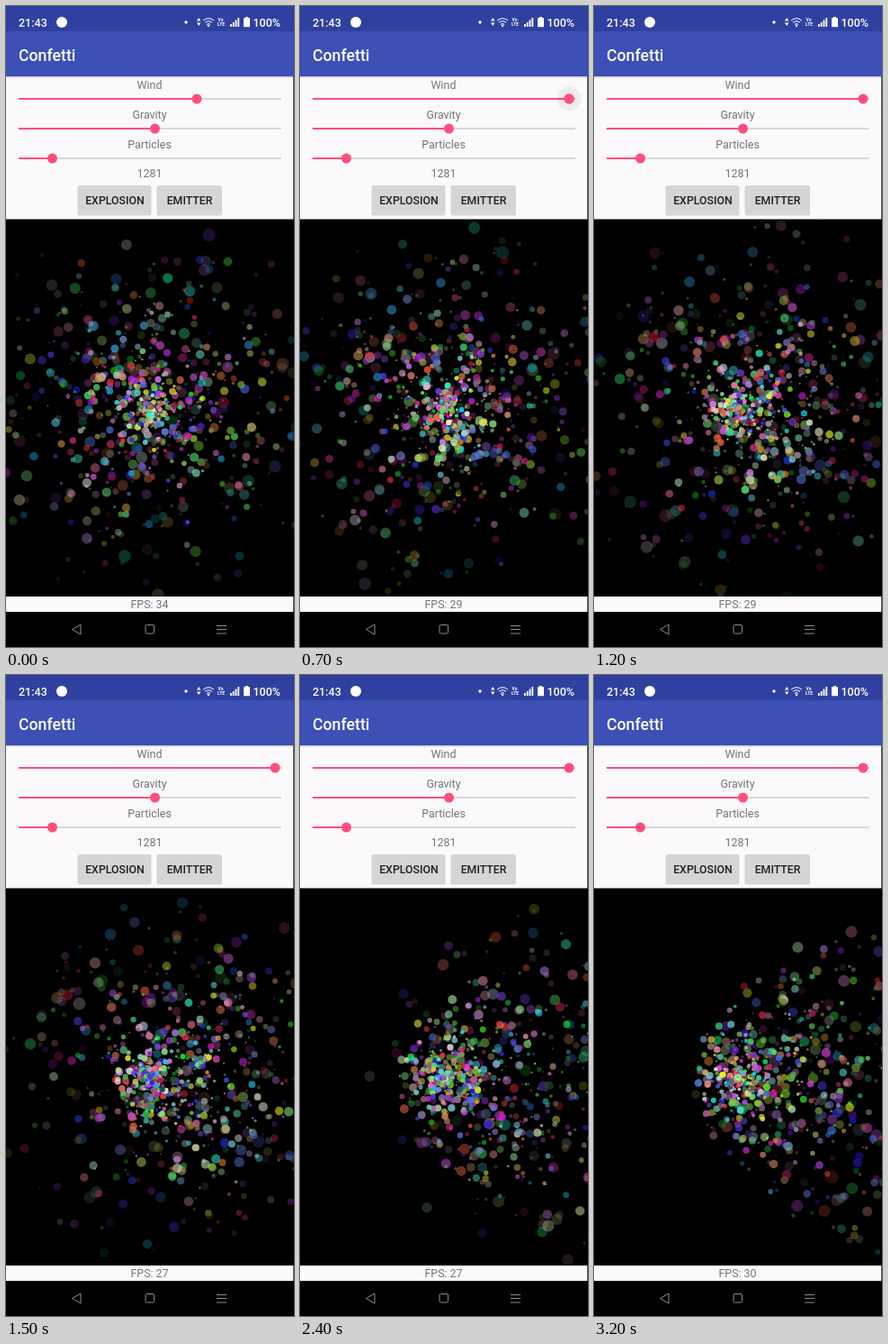
Animation of 320x711 px, one loop 3.3 s. Source, as an HTML page with a canvas:

```html
<!DOCTYPE html>
<html lang="en">
<head>
<meta charset="utf-8">
<title>Confetti</title>
<style>
  html, body { margin: 0; width: 100%; height: 100%; overflow: hidden; background: #000; }
  svg, canvas { position: absolute; left: 0; top: 0; display: block; }
  canvas { top: 236.5px; }
  text { font: 12.44px Roboto, sans-serif; fill: #757575; text-anchor: middle; }
  .title { font-size: 17.7px; font-weight: 500; fill: #fff; text-anchor: start; }
  .button { font-size: 12.3px; font-weight: 500; fill: #212121; }
  .status { font-size: 12.5px; font-weight: 500; fill: #fff; text-anchor: start; }
  .tiny { font-size: 5px; font-weight: 700; fill: #fff; }
  .track { stroke: #d9d7da; stroke-width: 1.8; }
  .active { stroke: #fe4f7c; stroke-width: 1.8; }
  .thumb { fill: #fe4f7c; }
</style>
</head>
<body>
<svg width="320" height="711" viewBox="0 0 320 711">
  <defs>
    <linearGradient id="shade" x2="0" y2="1">
      <stop stop-opacity=".22"/>
      <stop offset="1" stop-opacity="0"/>
    </linearGradient>
  </defs>
  <rect width="320" height="28" fill="#3040a0"/>
  <rect y="28" width="320" height="50" fill="#3c50b6"/>
  <rect y="78" width="319.3" height="158.5" fill="#fbf9fc"/>
  <rect y="78" width="319.3" height="2.5" fill="url(#shade)"/>
  <rect y="655" width="319.3" height="17" fill="#fbf9fc"/>

  <text class="status" x="14" y="22.6">21:43</text>
  <circle cx="62" cy="18" r="6" fill="#fff"/>
  <g fill="#fff">
    <circle cx="200" cy="18" r="1.7"/>
    <path d="M212 16.5l2.2-3.5 2.2 3.5zM212 18.5h4.4l-2.2 3.5z"/>
    <path d="M249 20h1.8v3H249zM251.8 18h1.8v5h-1.8zM254.6 15.5h1.8V23h-1.8zM257.4 13h1.8v10h-1.8z"/>
    <path d="M266 12h3v1.3h2V23.2h-7V13.3h2z"/>
    <circle cx="225" cy="22" r="1.2"/>
  </g>
  <path d="M219 16.2q6-5 12 0M221 18.4q4-3.2 8 0M222.9 20.4q2.1-1.6 4.2 0" fill="none" stroke="#fff"/>
  <text class="tiny" x="238.5" y="17">Vo</text>
  <text class="tiny" x="239" y="22">LTE</text>
  <text class="status" x="274.5" y="22.6">100%</text>

  <text class="title" x="14" y="60.6">Confetti</text>
  <text x="159.5" y="91.8">Wind</text>
  <text x="159.5" y="124.6">Gravity</text>
  <text x="159.5" y="157.6">Particles</text>
  <text x="159.5" y="190.2">1281</text>
  <g id="sliders"></g>

  <g fill="#000" fill-opacity=".14">
    <rect x="79.5" y="199.5" width="82" height="33" rx="2"/>
    <rect x="167.5" y="199.5" width="72.5" height="33" rx="2"/>
  </g>
  <g fill="#d5d4d6">
    <rect x="80" y="199" width="81" height="32" rx="1.5"/>
    <rect x="168" y="199" width="71.5" height="32" rx="1.5"/>
  </g>
  <text class="button" x="120.9" y="220.2">EXPLOSION</text>
  <text class="button" x="204" y="220.2">EMITTER</text>

  <text id="fps" x="159.5" y="668.4"></text>
  <g fill="none" stroke="#8c8c8c">
    <path d="M83 686v11l-9.5-5.5z"/>
    <rect x="155" y="686.5" width="9.5" height="9.5" rx="1.5"/>
    <path d="M234 687.5h11M234 691.5h11M234 696h11"/>
  </g>
</svg>
<canvas id="stage" width="320" height="418"></canvas>
<script>
const LOOP = 3300, STEP = 100;
const LIFE = 2.85, COUNT = 880, SPEED = 82, WIND = 64, WIND_START = 0.25;
const ctx = stage.getContext('2d');

const slider = (y, x) => `<g>
  <path class="track" d="M14 ${y}H306"/>
  <path class="active" d="M14 ${y}H${x}"/>
  <circle class="halo" cx="${x}" cy="${y}" r="13.5" fill="#000" fill-opacity="0"/>
  <circle class="thumb" cx="${x}" cy="${y}" r="5.5"/></g>`;
sliders.innerHTML = slider(103, 212) + slider(136, 165.5) + slider(169, 51.5);
const [active, halo, thumb] = ['.active', '.halo', '.thumb'].map(s => sliders.querySelector(s));

let seed = 20;
function random() {
  seed = (seed + 0x6D2B79F5) | 0;
  let n = Math.imul(seed ^ seed >>> 15, seed | 1);
  n ^= n + Math.imul(n ^ n >>> 7, n | 61);
  return ((n ^ n >>> 14) >>> 0) / 4294967296;
}

// Steady emission, from one lifetime before the loop starts until it ends.
const particles = [];
for (let born = -LIFE; born < LOOP / 1000; born += LIFE / COUNT) {
  const angle = random() * 2 * Math.PI, speed = SPEED * Math.sqrt(random());
  const channel = () => Math.round(20 + 235 * random());
  particles.push({
    born,
    vx: speed * Math.cos(angle),
    vy: speed * Math.sin(angle),
    size: 0.15 + 0.85 * random(),
    color: `rgb(${channel()},${channel()},${channel()})`
  });
}

function drawParticles(t) {
  ctx.globalAlpha = 1;
  ctx.fillStyle = '#000';
  ctx.fillRect(0, 0, 320, 418);
  for (const p of particles) {
    const age = t - p.born;
    if (age < 0 || age > LIFE) continue;
    const blown = Math.max(0, t - Math.max(p.born, WIND_START));
    const x = 160 + p.vx * age + WIND * blown * blown / 2;
    const y = 209 + p.vy * age;
    ctx.globalAlpha = 1 - 0.84 * age / LIFE;
    ctx.fillStyle = p.color;
    ctx.beginPath();
    ctx.arc(x, y, p.size * (3.3 + 4 * age / LIFE), 0, 2 * Math.PI);
    ctx.fill();
  }
}

function drawControls(t) {
  const x = Math.min(299, 212 + 175 * t);
  const press = Math.max(0, Math.min(1, t / 0.3, (0.8 - t) / 0.3));
  active.setAttribute('d', `M14 103H${x}`);
  halo.setAttribute('cx', x);
  halo.setAttribute('fill-opacity', 0.15 * press);
  thumb.setAttribute('cx', x);
  thumb.setAttribute('r', 5.5 + press);
  const rate = t < 0.5 ? 34 : t < 1.4 ? 29 : t < 2.6 ? 27 : t < 3.1 ? 28 : 30;
  fps.textContent = 'FPS: ' + rate;
}

const start = performance.now();
function frame() {
  const elapsed = (performance.now() - start) % LOOP;
  const t = Math.floor(elapsed / STEP) * STEP / 1000;
  drawParticles(t);
  drawControls(t);
  requestAnimationFrame(frame);
}
frame();
</script>
</body>
</html>
```
